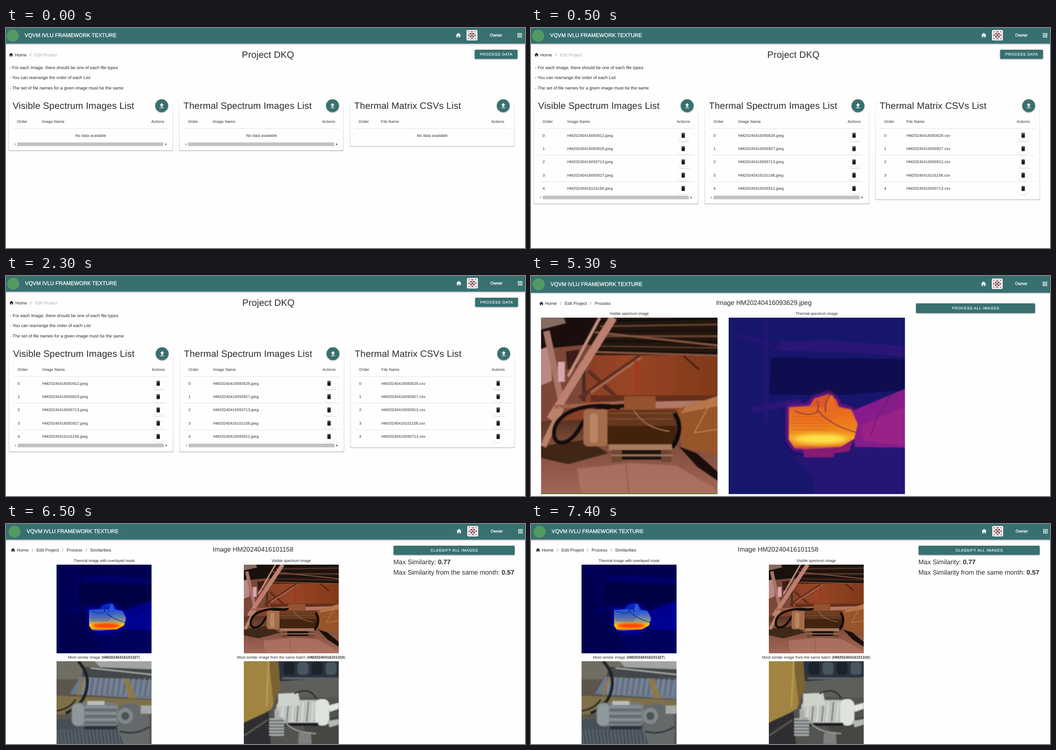
Write an HTML page that moves like this. It is 1150 px wide and 487 px high and loops after 8 s.

```html
<!DOCTYPE html>
<html lang="en">
<head>
<meta charset="utf-8">
<title>Component inspection</title>
<style>
  html, body { margin: 0; width: 100%; height: 100%; overflow: hidden; background: #fefefe; }
  svg { display: block; }
  text { font-family: "Liberation Sans", Arial, sans-serif; text-rendering: geometricPrecision; }
  .h4 { letter-spacing: .0074em; }
  .cell { letter-spacing: .0178em; }
  .label { letter-spacing: .0892em; }
</style>
</head>
<body>
<svg id="stage" width="1150" height="487" viewBox="0 0 1150 487">
  <defs>
    <filter id="lift" x="-20%" y="-30%" width="140%" height="180%">
      <feDropShadow dx="0" dy="1.2" stdDeviation="1.1" flood-opacity=".4"/>
    </filter>
    <filter id="soft" x="-5%" y="-5%" width="110%" height="110%"><feGaussianBlur stdDeviation="1.1"/></filter>
    <filter id="glow" x="-40%" y="-100%" width="180%" height="300%"><feGaussianBlur stdDeviation="5"/></filter>
    <linearGradient id="side" x1="0" y1="0" x2="0" y2="1">
      <stop offset="0" stop-color="#ccc" stop-opacity="0"/><stop offset=".3" stop-color="#ddd"/><stop offset="1" stop-color="#ccc"/>
    </linearGradient>
    <linearGradient id="floor" x1="0" y1="0" x2="0" y2="1">
      <stop offset="0" stop-color="#4e2d1c"/><stop offset=".35" stop-color="#7f4c3a"/><stop offset="1" stop-color="#a4685a"/>
    </linearGradient>
    <linearGradient id="wall" x1="0" y1="0" x2="1" y2="0">
      <stop offset="0" stop-color="#7c3c28"/><stop offset=".5" stop-color="#984525"/><stop offset="1" stop-color="#80391a"/>
    </linearGradient>
  </defs>
</svg>
<script>
const TEAL = '#39706f', INK = '#2b2b2b';
const ICONS = {
  home: 'M10,20V14H14V20H19V12H22L12,3L2,12H5V20H10Z',
  bin: 'M19,4H15.5L14.5,3H9.5L8.5,4H5V6H19M6,19A2,2 0 0,0 8,21H16A2,2 0 0,0 18,19V7H6V19Z',
  upload: 'M9,16V10H5L12,3L19,10H15V16H9M5,20V18H19V20H5Z'
};
const BODY = 9.7, CELL = 8.5, H4 = 20.57, H5 = 14.53;

// y is the middle of the capitals
const text = (x, y, str, size = BODY, attrs = '', fill = INK) =>
  `<text x="${x}" y="${y + size * .358}" font-size="${size}" fill="${fill}" ${attrs}>${str}</text>`;
const mid = 'text-anchor="middle"';
const cell = (x, y, str, attrs = '') => text(x, y, str, CELL, `class="cell" ${attrs}`);
const rect = (x, y, w, h, fill, attrs = '') =>
  `<rect x="${x}" y="${y}" width="${w}" height="${h}" fill="${fill}" ${attrs}/>`;
const poly = (points, fill, attrs = '') => `<polygon points="${points}" fill="${fill}" ${attrs}/>`;
const oval = (x, y, rx, ry, fill, attrs = '') =>
  `<ellipse cx="${x}" cy="${y}" rx="${rx}" ry="${ry}" fill="${fill}" ${attrs}/>`;
const line = (d, color, width, attrs = '') =>
  `<path d="${d}" fill="none" stroke="${color}" stroke-width="${width}" ${attrs}/>`;
const icon = (name, x, y, scale, fill) =>
  `<path transform="translate(${x} ${y}) scale(${scale}) translate(-12 -12)" d="${ICONS[name]}" fill="${fill}"/>`;
const range = (n, fn) => Array.from({ length: n }, (_, i) => fn(i)).join('');
const bold = str => `<tspan font-weight="bold">${str}</tspan>`;

function avatar(x, y) {
  const quarter = poly('-9,-9 -4.5,-9 -9,-4.5', '#bb7a78') +
    poly('-4,-9 0,-5.5 4,-9', '#b0605f') + poly('-5,-5 0,-5 -5,0', '#4c3a42');
  return `<g transform="translate(${x} ${y})">` + rect(-12, -11.5, 24, 23, '#fff', 'rx="2"') +
    range(4, i => `<g transform="rotate(${i * 90})">${quarter}</g>`) +
    poly('0,-3 3,0 0,3 -3,0', '#8a4a50') + '</g>';
}

function header(logoX, titleX, dx, h) {
  const y = h / 2 - 1.2;
  const medium = 'stroke="#fff" stroke-width=".3"';
  return rect(-5, -5, 1160, h + 5, TEAL, 'filter="url(#lift)"') +
    oval(logoX, y + 1, 13.3, 13.3, '#529a62') +
    text(titleX, y, 'VQVM IVLU FRAMEWORK TEXTURE', 11.8, medium, '#fff') +
    icon('home', 1002.3 + dx, y, .58, '#fff') + avatar(1032.5 + dx, y) +
    text(1072 + dx, y - .5, 'Owner', 9.3, medium, '#fff') +
    range(9, i => rect(1133.3 + dx + i % 3 * 3.6, y - 4.7 + (i / 3 | 0) * 3.6, 2.5, 2.5, '#fff'));
}

const button = (x, y, w, h, label) =>
  rect(x, y, w, h, TEAL, 'rx="2" filter="url(#lift)"') +
  text(x + w / 2 + .4, y + h / 2, label, 8.33, `${mid} class="label" stroke="#fff" stroke-width=".2"`, '#fff');

// steps: [x, label] pairs, slashes: x positions
const crumbs = (x, y, steps, slashes, lastColor = INK) =>
  icon('home', x, y, .47, '#222') +
  steps.map(([sx, s], i) => text(sx, y, s, BODY, '', i === steps.length - 1 ? lastColor : INK)).join('') +
  slashes.map(sx => text(sx, y, '/', BODY, mid, '#777')).join('');

const LISTS = [
  { x: 5.5, title: 'Visible Spectrum Images List', kind: 'Image', ext: 'jpeg', name: 74, act: 316.5, bar: 1,
    ids: ['093912', '093629', '093713', '093927', '101158'] },
  { x: 384, title: 'Thermal Spectrum Images List', kind: 'Image', ext: 'jpeg', name: 74, act: 316.5, bar: 1,
    ids: ['093629', '093927', '093713', '101158', '093912'] },
  { x: 762.3, title: 'Thermal Matrix CSVs List', kind: 'File', ext: 'csv', name: 68.5, act: 313, bar: 0,
    ids: ['093629', '093927', '093912', '101158', '093713'] }
];

function card(list, filled) {
  const binX = list.act + 14.3;
  const barY = filled ? 371.2 : 253.4;
  const end = barY + (list.bar ? 18 : 8.6);
  let s = rect(-.5, 155, 1, end - 156, 'url(#side)') + rect(363.5, 155, 1, end - 156, 'url(#side)') +
    line(`M0 ${end - 2}Q0 ${end} 2 ${end}H362Q364 ${end} 364 ${end - 2}`, '#b9b9b9', 1.2) +
    line(`M2 ${end + 1.2}H362`, '#e4e4e4', 1) +
    text(9.3, 172, list.title, H4, 'class="h4"') +
    oval(339.5, 172, 14.3, 14.3, TEAL, 'filter="url(#lift)"') +
    icon('upload', 339.5, 172, .65, '#fff') +
    cell(19.3, 207, 'Order') + cell(list.name, 207, list.kind + ' Name') +
    cell(list.act, 207, 'Actions') + line('M10 222.7H354.5', '#e2e2e2', 1);
  if (filled) {
    s += line('M10 281.5H354.5M10 340.5H354.5', '#e2e2e2', 1);
    s += list.ids.map((id, i) => {
      const y = 237.5 + i * 29.45;
      return oval(binX, y, 14, 14, '#fefefe') +
        line(`M${binX - 12} ${y + 8}A14.5 14.5 0 0 0 ${binX + 12} ${y + 8}`, '#d2d2d2', .9) +
        (i % 2 || i === 4 ? '' : line(`M${binX - 11} ${y + 14.6}h28`, '#d8d8d8', .9)) +
        cell(19.3, y, i) + cell(list.name, y, `HM20240416${id}.${list.ext}`) +
        icon('bin', binX, y, .61, '#1c1c1c');
    }).join('');
  } else {
    s += cell(182.3, 237.5, 'No data available', mid);
  }
  if (list.bar) {
    const m = barY + 4;
    s += rect(19.5, barY, 323.5, 8, '#c1c1c1') +
      poly(`12.7,${m} 15.7,${m - 2.4} 15.7,${m + 2.4}`, '#999') +
      poly(`350.3,${m} 347.3,${m - 2.4} 347.3,${m + 2.4}`, '#333');
  }
  return `<g transform="translate(${list.x} 0)">${s}</g>`;
}

function project(filled) {
  const dx = filled ? 1 : 0;
  return header(15 + dx, 41.3 + dx, dx, 34.5) + `<g transform="translate(${dx} 0)">` +
    crumbs(11.2, 59.3, [[19.7, 'Home'], [63, 'Edit Project']], [54.3], '#b0b0b0') +
    text(580.5, 59, 'Project DKQ', H4, `${mid} class="h4"`) + button(1038.5, 48, 95, 20.3, 'PROCESS DATA') +
    ['For each Image, there should be one of each file types',
      'You can rearrange the order of each List',
      'The set of file names for a given image must be the same'
    ].map((s, i) => text(7.8, 87.3 + i * 22.7, '- ' + s)).join('') +
    LISTS.map(l => card(l, filled)).join('') + '</g>';
}

// Fits a picture of size w × h into the box (x, y, bw, bh)
const frame = (x, y, bw, bh, w, h, body) =>
  `<svg x="${x}" y="${y}" width="${bw}" height="${bh}" viewBox="0 0 ${w} ${h}" preserveAspectRatio="none">` +
  `<g filter="url(#soft)">${body}</g></svg>`;

const plant = () =>
  rect(-5, -5, 401, 401, 'url(#wall)') +
  rect(-5, -5, 401, 88, '#24150f') +
  range(7, i => line(`M130 ${8 + i * 11}L395 ${2 + i * 13}`, i % 2 ? '#6b4636' : '#0f0a08', 4 - i % 3)) +
  line('M100 30L395 62M120 76L395 84', '#85543f', 4) +
  poly('-5,60 110,60 95,190 -5,240', '#7d4737') + poly('-5,15 60,0 140,0 100,60 -5,70', '#1a110d') +
  poly('0,0 50,0 55,12 0,26', '#876a60') + poly('0,70 20,62 24,140 0,150', '#b98a84') +
  line('M12 30L48 200', '#a87469', 14) + line('M45 98V142', '#d8a6ac', 15) + line('M95 90V185', '#4d2b20', 8) +
  poly('55,75 85,70 78,110 58,115', '#3a1f16') +
  line('M220 84L85 178M105 118L180 188', '#5f2f20', 9) + line('M222 88L110 166', '#a8674e', 5) +
  line('M212 95V165', '#a03a22', 10) + line('M160 0L20 225', '#bd8070', 17) + line('M130 0L60 130', '#c28f7d', 6) +
  line('M315 84L350 115', '#4a2618', 5) +
  rect(110, 172, 286, 14, '#642f1c') + poly('250,186 396,183 396,198 250,201', '#b27868') +
  poly('-5,230 396,215 396,396 -5,396', 'url(#floor)') + poly('-5,285 100,270 150,300 60,325 -5,310', '#3f2819') +
  poly('80,335 200,322 300,328 380,375 396,396 90,396', '#b07465', 'opacity=".75"') +
  line('M188 325L195 396', '#8c5848', 2) +
  poly('295,205 396,172 396,305 312,288', '#98552a') + poly('320,197 396,172 396,195 310,212', '#b8744a') +
  line('M380 180L340 255L396 247', '#c4844a', 2) +
  poly('305,285 345,300 396,345 396,365 345,330', '#1a100a') +
  line('M30 198L190 188', '#a0644e', 8) + line('M5 285L45 200', '#b9816a', 13) +
  line('M175 200C110 185 40 205 30 245S60 290 85 245S120 200 200 194', '#120c09', 9) +
  rect(184, 174, 70, 30, '#94532f', 'rx="4"') + rect(94, 203, 56, 82, '#a36c4b', 'rx="10"') +
  rect(108, 212, 18, 66, '#b98562', 'rx="8"') + rect(147, 204, 156, 80, '#63391f', 'rx="6"') +
  rect(147, 240, 152, 40, '#422410') + line('M150 212H290M150 224H290', '#804c2d', 3) +
  line('M205 205Q230 245 285 252', '#b07852', 2) +
  line('M296 212C312 235 308 265 290 288', '#100b08', 10) +
  rect(150, 281, 140, 13, '#a87a60') + rect(163, 293, 115, 22, '#1e130b') +
  rect(156, 293, 23, 27, '#6e4733') + rect(266, 293, 23, 27, '#6e4733') + line('M155 305H292', '#9c6e56', 4);

const HOT = {
  bg: '#17126c', dark: '#10104f', beam: '#2c1475', floor: '#281573', cone: '#861c8c', edge: '#a82684',
  halo: '#8c1f80', base: '#871b72', box: '#dd5626', ink: '#6b1f4a', core: '#fbe04a',
  ramp: ['#d9502f', '#e86c20', '#ec7a1c', '#f08c1c', '#f6ac24', '#ee8420', '#b5305c']
};
const JET = {
  bg: '#000052', dark: '#000044', beam: '#000068', floor: '#00005e', cone: '#00008c', edge: '#00009c',
  halo: '#0000b4', base: '#000092', box: '#0a28c8', ink: '#001070', core: '#ff4800',
  ramp: ['#0a30d8', '#2a58d0', '#6680a8', '#a8a470', '#ffc800', '#ffb400', '#0c40d8']
};

function thermal(c, id) {
  const stops = [0, .3, .52, .68, .79, .92, 1];
  const body = '134,199 180,196 190,180 222,170 238,182 244,198 272,204 286,236 278,268 248,286 170,292 146,288 134,270';
  return `<linearGradient id="${id}" x1="0" y1="0" x2="0" y2="1">` +
    stops.map((o, i) => `<stop offset="${o}" stop-color="${c.ramp[i]}"/>`).join('') + '</linearGradient>' +
    rect(-5, -5, 401, 401, c.bg) + poly('95,88 396,92 396,160 240,172 90,170', c.dark) +
    poly('112,52 230,50 396,64 396,86 250,76 104,72', c.beam) +
    line('M82 5V240M20 38L95 62', c.beam, 10, 'opacity=".65"') +
    line('M50 205L160 185', c.beam, 14) +
    poly('140,308 290,285 396,288 396,396 190,396 190,355', c.floor) +
    poly('276,206 396,156 396,288 280,286', c.cone) + poly('290,240 396,195 396,286 300,272', c.edge, 'opacity=".55"') +
    line('M360 170L325 230L316 260', c.ink, 3, 'opacity=".6"') +
    poly(body, c.halo, `filter="url(#glow)" stroke="${c.halo}" stroke-width="10"`) +
    poly('142,280 275,270 268,296 235,300 232,309 168,309 165,292 145,292', c.base) +
    poly(body, `url(#${id})`) + poly('182,197 192,179 222,170 238,182 244,198', c.box) +
    poly('214,205 218,175 230,172 240,200', c.ramp[1]) +
    oval(204, 269, 58, 11, c.core, 'filter="url(#glow)"') + oval(204, 269, 40, 6, c.core) +
    range(5, i => line(`M140 ${220 + i * 7}H${235 - i * 5}`, c.box, 1.4)) +
    line('M145 206Q175 220 195 210Q203 195 195 184M198 206Q225 238 282 254M215 210Q212 190 224 172', c.ink, 2);
}

const oldMotor = () =>
  rect(-5, -5, 220, 193, '#5a574d') + rect(-5, -5, 220, 45, '#6f6d62') +
  poly('80,-5 215,-5 215,24 100,18', '#a0a5a4') + poly('60,12 215,18 215,45 55,34', '#43464a') +
  line('M75 15L215 30', '#a9aaa5', 3) + poly('52,35 215,42 215,84 30,72', '#6d798b') +
  range(26, i => line(`M${57 + i * 6} 37l-6 38`, i % 2 ? '#8793a6' : '#545f6f', 1.6)) +
  poly('148,38 160,39 176,82 160,82', '#8f794a') + line('M62 36L48 75', '#8f794a', 6) +
  poly('-5,76 215,86 215,108 -5,118', '#7f7049') + poly('-5,130 60,125 150,150 150,188 -5,188', '#474f58') +
  range(18, i => line(`M${i * 8} 150l5 36`, '#68737b', 1.6)) +
  line('M48 0Q75 30 66 65T20 115', '#1e2326', 7) + line('M0 110Q30 105 42 85', '#252a2c', 4) +
  rect(33, 92, 105, 52, '#737d82', 'rx="14"') + rect(35, 94, 26, 48, '#8f989b', 'rx="10"') +
  range(6, i => line(`M62 ${101 + i * 7}H132`, i % 2 ? '#4c555a' : '#9ba3a4', 2)) +
  rect(68, 88, 38, 9, '#b9bdb8') + rect(62, 143, 70, 8, '#2b3034') +
  poly('138,98 165,92 205,105 205,188 150,188 136,150', '#646a69') +
  oval(152, 121, 17, 18, '#81878a') + oval(152, 121, 9, 9, '#4c5355') +
  rect(186, 98, 24, 18, '#a5aaa8') + line('M140 155Q175 165 205 145', '#343b3e', 4);

const newMotor = () =>
  rect(-5, -5, 220, 193, '#53524f') + rect(75, -5, 140, 55, '#2b333d') +
  range(4, i => rect(88 + i * 31, 2, 24, 28, i % 2 ? '#485460' : '#1b232c', 'rx="7"')) +
  line('M85 38H210', '#5f6971', 4) + poly('75,45 215,35 215,80 75,78', '#5f5e5a') +
  poly('-5,-5 76,-5 80,55 62,105 6,138 -5,138', '#a08440') +
  poly('55,-5 76,-5 80,55 66,98', '#7a6232') + line('M55 0L50 100', '#b49a58', 4) +
  poly('-5,138 55,110 60,188 -5,188', '#2e2e32') + line('M0 165L52 130', '#59564f', 4) +
  poly('130,140 215,120 215,188 150,188', '#474743') +
  rect(72, 86, 116, 52, '#bfc4bf', 'rx="16"') + rect(158, 84, 31, 58, '#dfe3dd', 'rx="13"') +
  range(7, i => line(`M${88 + i * 11} 90l-4 44`, i % 2 ? '#6a7271' : '#dde0da', 2.6)) +
  poly('76,72 120,70 126,98 76,100', '#cdd2cb') + line('M112 72Q145 55 160 82', '#1b2025', 3) +
  rect(90, 136, 75, 7, '#1c1f22') + poly('122,158 148,156 150,183 120,183', '#7c807f') +
  rect(56, 125, 33, 41, '#737979', 'rx="6"') + range(6, i => line(`M56 ${128 + i * 7}h33`, '#b9bebb', 2)) +
  rect(68, 106, 10, 22, '#a9aeac') + line('M88 130Q105 158 160 160', '#99988c', 3) +
  poly('188,98 210,92 210,105 190,112', '#e3e5df') + poly('185,132 210,128 210,140 190,146', '#b4b8b3');

const processing = () =>
  header(17, 43.3, .5, 37) +
  crumbs(23, 61, [[31.3, 'Home'], [74.6, 'Edit Project'], [141.5, 'Process']], [66, 132.7]) +
  text(516, 58.4, 'Image HM20240416093629.jpeg', H5, mid) +
  button(853, 60.5, 264, 21.5, 'PROCESS ALL IMAGES') +
  text(217.5, 83, 'Visible spectrum image', 8.45, mid) + text(633, 83, 'Thermal spectrum image', 8.45, mid) +
  frame(22.3, 92.3, 391, 390.5, 391, 391, plant()) + rect(22.3, 481, 391, 2, '#5c7423') +
  frame(438, 92.3, 390.6, 390.5, 391, 391, thermal(HOT, 'hot'));

const similar = () =>
  header(19, 45.8, 1.7, 34.5) +
  crumbs(15.6, 57.7, [[24, 'Home'], [67.4, 'Edit Project'], [134.2, 'Process'], [186.3, 'Similarities']],
    [58.5, 125.5, 177.6]) +
  text(547.3, 55.3, 'Image HM20240416101158', H5, mid) +
  button(858.7, 48, 268.5, 20.2, 'CLASSIFY ALL IMAGES') +
  text(858.5, 84, 'Max Similarity: ' + bold('0.77'), H5) +
  text(858.5, 107, 'Max Similarity from the same month: ' + bold('0.57'), H5) +
  text(217.3, 81.3, 'Thermal image with overlayed mask', 8.45, mid) +
  text(632, 81.3, 'Visible spectrum image', 8.45, mid) +
  frame(112, 90, 210.5, 196.3, 391, 391, thermal(JET, 'jet')) +
  frame(527, 90, 210.3, 196.3, 391, 391, plant()) +
  text(217.2, 295, `Most similar image (${bold('HM20240416101327')})`, 8.57, mid) +
  text(632, 295, `Most similar image from the same batch (${bold('HM20240416101310')})`, 8.57, mid) +
  frame(112, 303.7, 210.5, 183.3, 210, 183, oldMotor()) +
  frame(527, 303.7, 210.3, 183.3, 210, 183, newMotor());

const LOOP = 8000;
const scenes = [
  [0, project(false)], [500, project(true)], [3500, processing()], [6500, similar()]
];
const stage = document.getElementById('stage');
stage.insertAdjacentHTML('beforeend', scenes.map(([, s]) => `<g class="scene">${s}</g>`).join(''));
const groups = [...stage.querySelectorAll('.scene')];
const start = performance.now();

function tick() {
  const t = (performance.now() - start) % LOOP;
  const now = scenes.filter(([at]) => at <= t).length - 1;
  groups.forEach((g, i) => { g.style.display = i === now ? '' : 'none'; });
  requestAnimationFrame(tick);
}
tick();
</script>
</body>
</html>
```
